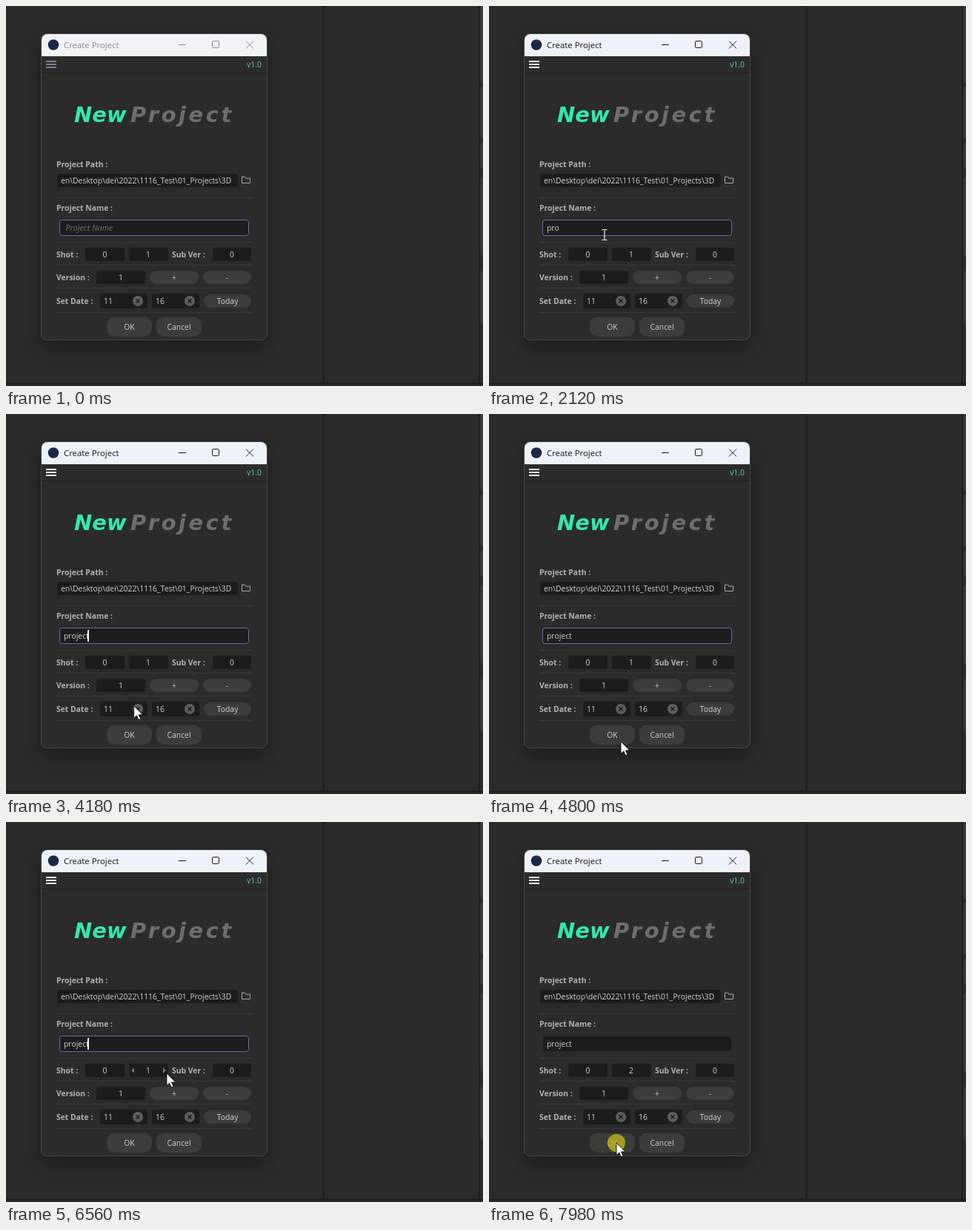
These frames come from a looping animation (644x514 px, 8 s). An HTML page:

```html
<!DOCTYPE html>
<html lang="en">
<head>
<meta charset="utf-8">
<title>Create Project</title>
<style>
html, body { margin: 0; width: 100%; height: 100%; overflow: hidden; background: #2b2b2b; }
svg { display: block; }
text { font: 10.4px "Open Sans", "Noto Sans", sans-serif; fill: #d2d2d2; white-space: pre; }
.label { font-weight: 700; fill: #b2b2b2; }
.mid { text-anchor: middle; }
.field { fill: #1c1c1c; }
.button { fill: #3c3c3a; }
.rule { stroke: #393939; }
.logo { font: italic bold 29px "DejaVu Sans", sans-serif; }
.focus { fill: none; stroke: #5f6cba; }
.hidden { display: none; }
#window { fill: #2b2b2b; filter: drop-shadow(0 10px 13px rgba(0, 0, 0, .36)); }
#caption text { font-size: 11.4px; fill: currentColor; }
#hint { font-style: italic; font-size: 10.8px; fill: #707070; }
</style>
</head>
<body>
<svg width="644" height="514" viewBox="0 0 644 514">
  <rect width="644" height="514" fill="#2b2b2b"/>
  <g fill="#1f1f1f">
    <rect x="427.5" width="2.5" height="510"/>
    <rect x="638" width="2" height="510"/>
    <rect y="509.5" width="644" height="2"/>
  </g>
  <g id="panels" fill="#3b3b3a"></g>

  <rect id="window" x="48" y="38" width="304" height="414" rx="8"/>
  <rect x="47.5" y="37.5" width="305" height="414" rx="8" fill="none" stroke="#484848"/>
  <path id="bar" d="M48 68V46a8 8 0 0 1 8-8H344a8 8 0 0 1 8 8V68Z"/>
  <circle cx="64" cy="52.5" r="7.3" fill="#1c2946"/>
  <g id="caption">
    <text x="78" y="56.7">Create Project</text>
    <path d="M233 52.5h10M324 47.5l10 10m0-10l-10 10" fill="none" stroke="currentColor"/>
    <rect x="278.5" y="47.5" width="9" height="9" rx="1" fill="none" stroke="currentColor"/>
  </g>
  <path id="menu" d="M54 75h14M54 79h14M54 83h14" stroke-width="2"/>
  <text x="345" y="83" text-anchor="end" style="fill:#62cdbb">v1.0</text>
  <path d="M48 90.5H352" stroke="#1f1f1f"/>

  <text class="logo" x="92" y="157" style="fill:#35e8a9">New</text>
  <text class="logo" x="168" y="157" style="fill:#6e6e6e" letter-spacing="3.5">Project</text>

  <g id="form"></g>
  <path d="M318.5 239.5v-8.5h4l1.5 2h5.5v6.5Z" fill="none" stroke="#a8a8a8"/>
  <g id="clears"></g>

  <rect id="nameFocus" class="focus" x="72.5" y="289.5" width="255" height="21" rx="3"/>
  <text id="hint" x="80.5" y="304">Project Name</text>
  <text id="typed" x="78" y="304"></text>
  <rect id="caret" y="292" width="2" height="16" fill="#f2f2f2"/>

  <rect id="spinFocus" class="focus" x="165.5" y="326.5" width="54" height="19" rx="3"/>
  <text id="spin" class="mid" x="192" y="340"></text>
  <path id="arrows" d="M173 332.5v7l-4-3.5ZM212 332.5v7l4-3.5Z" fill="#777"/>

  <g id="tip">
    <rect x="155.5" y="332.5" width="76" height="20" fill="#1c1c1c" stroke="#171717"/>
    <text x="160" y="347">Project Name</text>
  </g>

  <circle id="click" r="12" fill="#b3ab1b" opacity=".88"/>
  <path id="arrow" d="M0 0V16.5L3.8 13L6.3 18.8L9 17.7L6.5 12H11.8Z" fill="#fff" stroke="#111" stroke-width=".9"/>
  <path id="beam" d="M-3.5-6.5H-1L0-6L1-6.5H3.5M0-6V7M-3.5 7.5H-1L0 7L1 7.5H3.5" fill="none" stroke="#f4f4f4" stroke-width="1.2"/>
</svg>
<script>
const LOOP = 8000;
const $ = id => document.getElementById(id);
const rect = (cls, x, y, w, h, r = 3) =>
  `<rect class="${cls}" x="${x}" y="${y}" width="${w}" height="${h}" rx="${r}"/>`;
const text = (cls, x, y, s) => `<text class="${cls}" x="${x}" y="${y}">${s}</text>`;
const field = (x, y, w, h, s = "") =>
  rect("field", x, y, w, h) + text("mid", x + w / 2, y + h / 2 + 4, s);
const button = (x, y, w, h, s, r = h / 2) =>
  rect("button", x, y, w, h, r) + text("mid", x + w / 2, y + h / 2 + 4, s);

$("panels").innerHTML = [[-5, 110], [109, 71], [185, 35], [231, 107], [358, 72]]
  .map(([y, h]) => `<rect x="641" y="${y}" width="8" height="${h}" rx="3"/>`).join("");

$("form").innerHTML = [
  ...[259.5, 319.5, 350.5, 381.5, 414.5].map(y => `<path class="rule" d="M68 ${y}H332"/>`),
  text("label", 68, 218, "Project Path :"),
  rect("field", 69, 227, 244, 18),
  text("", 74, 240, "en\\Desktop\\dei\\2022\\1116_Test\\01_Projects\\3D"),
  text("label", 68, 277, "Project Name :"),
  rect("field", 73, 290, 254, 20),
  text("label", 68, 340, "Shot :"),
  field(107, 327, 53, 18, "0"),
  field(166, 327, 53, 18),
  text("label", 224, 340, "Sub Ver :"),
  field(279, 327, 52, 18, "0"),
  text("label", 68, 371, "Version :"),
  field(122, 358, 66, 18, "1"),
  button(194, 358, 66, 18, "+"),
  button(266, 358, 65, 18, "-"),
  text("label", 68, 403, "Set Date :"),
  rect("field", 127, 389, 64, 20), text("", 132, 403, "11"),
  rect("field", 197, 389, 64, 20), text("", 202, 403, "16"),
  button(267, 390, 64, 18, "Today"),
  button(136, 421, 61, 26, "OK", 10),
  button(203, 421, 61, 26, "Cancel", 10),
].join("");

$("clears").innerHTML = [178, 248].map(x =>
  `<circle cx="${x}" cy="399" r="7" fill="#5b605d"/>
   <path d="M${x - 2.5} 396.5l5 5m0-5l-5 5" stroke="#1c1c1c" stroke-width="1.6"/>`).join("");

// time, x, y of the pointer
const path = [
  [70, 356, 415], [630, 156, 309], [3910, 156, 309], [4400, 185, 458],
  [4600, 179, 443], [4800, 178, 443], [4940, 166, 443], [5670, 166, 443],
  [6080, 216, 340], [6280, 217, 340], [7370, 217, 340], [7650, 172, 434], [LOOP, 172, 434],
];
const keys = [1700, 1900, 1970, 2320, 2390, 2720, 2850];
const caretOn = [[1030, 1570], [1700, 2120], [2320, 3310], [3910, 4440], [5140, 5670], [6280, 6700]];
const tipOn = [[1500, 1700], [3310, 3910]];
const clicks = [[890, 1100, 156, 308], [6960, 7170, 217, 340], [7980, LOOP, 172, 434]];

const during = (spans, t) => spans.find(([a, b]) => t >= a && t < b);
const show = (id, on) => $(id).classList.toggle("hidden", !on);
const move = (id, x, y) => $(id).setAttribute("transform", `translate(${x} ${y})`);
const inside = (x, y, l, t, r, b) => x >= l && x <= r && y >= t && y <= b;
const mix = (a, b, k) => `rgb(${a.map((v, i) => Math.round(v + (b[i] - v) * k))})`;

function pointer(t) {
  const i = Math.max(1, path.findIndex(p => p[0] > t));
  const [a, ax, ay] = path[i - 1], [b, bx, by] = path[i];
  const u = Math.min(1, Math.max(0, (t - a) / (b - a)));
  const k = u * u * (3 - 2 * u);
  return [ax + (bx - ax) * k, ay + (by - ay) * k];
}

function draw(t) {
  const active = Math.min(1, Math.max(0, (t - 890) / 140));
  $("bar").style.fill = mix([241, 243, 245], [238, 243, 251], active);
  $("caption").style.color = mix([138, 138, 138], [22, 22, 22], active);
  $("menu").style.stroke = mix([124, 128, 142], [248, 248, 248], active);

  const typed = "project".slice(0, keys.filter(k => t >= k).length);
  $("typed").textContent = typed;
  show("hint", !typed);
  const width = typed ? $("typed").getComputedTextLength() : 0;
  $("caret").setAttribute("x", Math.round(78 + Math.max(0, width - 2)));
  show("caret", during(caretOn, t));
  show("tip", during(tipOn, t));

  show("nameFocus", t < 6960);
  show("spinFocus", t >= 6960 && t < 7980);
  $("spin").textContent = t < 6960 ? 1 : 2;

  const [x, y] = pointer(t), visible = t >= 70;
  const overName = inside(x, y, 72, 289, 328, 311);
  show("arrows", visible && inside(x, y, 166, 327, 219, 345));
  show("arrow", visible && !overName);
  show("beam", visible && overName);
  move("arrow", x, y);
  move("beam", x, y);

  const click = during(clicks, t);
  show("click", click);
  if (click) move("click", click[2], click[3]);
}

let start;
function tick(now) {
  start ??= now;
  draw((now - start) % LOOP);
  requestAnimationFrame(tick);
}
draw(0);
requestAnimationFrame(tick);
</script>
</body>
</html>
```
